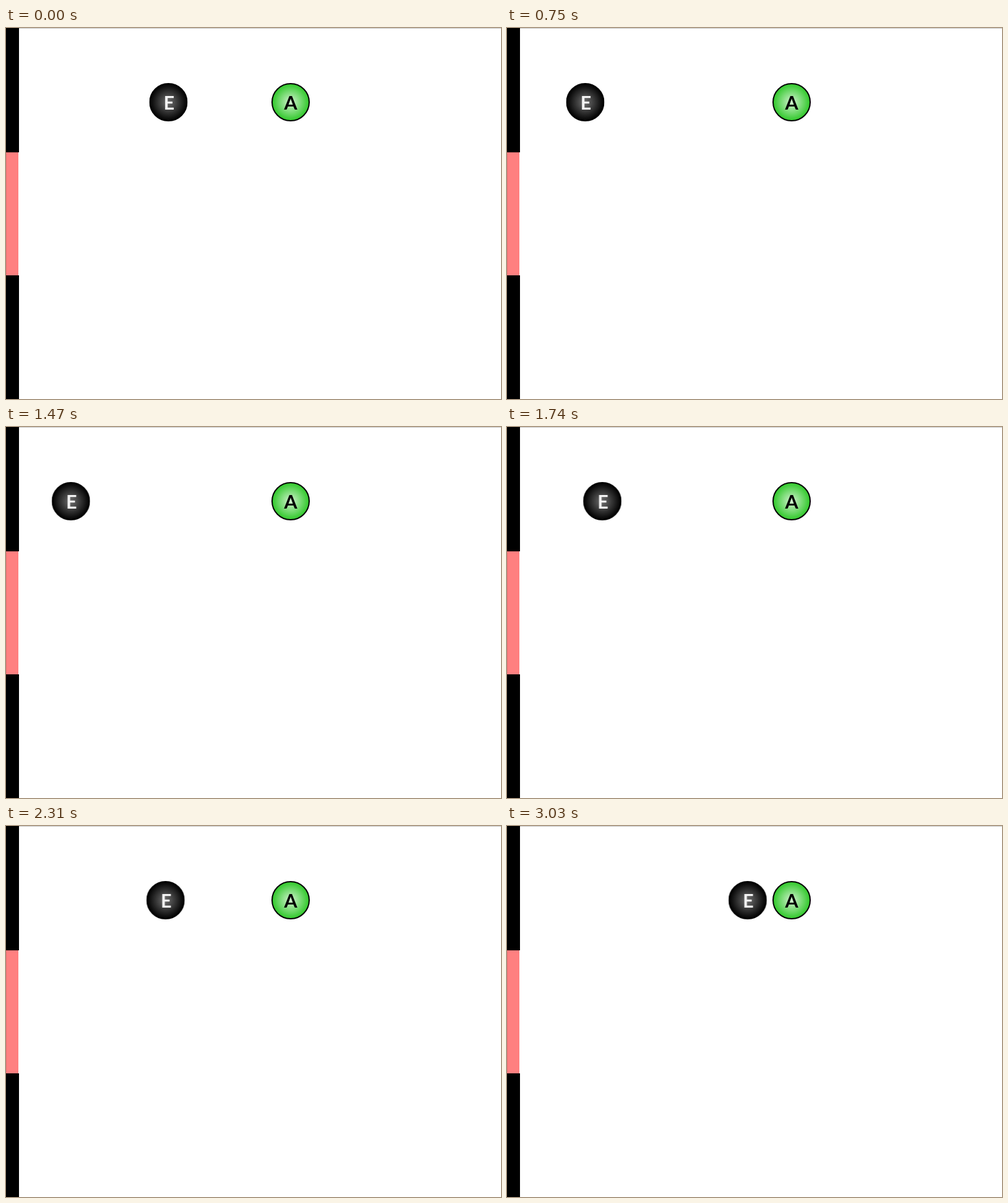
Animation of 800 by 600 pixels, one loop 3060 ms. Source, as an HTML page:

```html
<!DOCTYPE html>
<html lang="en">
<head>
<meta charset="utf-8">
<title>Bouncing ball</title>
<style>
  html, body { margin: 0; width: 100%; height: 100%; overflow: hidden; background: #fff; }
  svg { display: block; width: 800px; height: 600px; }
  text { font: bold 30.5px Lato, Carlito, sans-serif; text-anchor: middle; }
  circle { stroke: #000; stroke-width: 2px; }

  /* 30 ms ticks; the tiny delay keeps ticks clear of rounding */
  .mover { animation: bounce 3060ms -1ms infinite; }
  @keyframes bounce {
    0% { transform: translate(262.5px, 120px); animation-timing-function: steps(39); }
    38.2353% { transform: translate(50.2px, 120px); animation-timing-function: steps(63); }
    100% { transform: translate(394.4px, 120px); }
  }
</style>
</head>
<body>
<svg viewBox="0 0 800 600">
  <defs>
    <radialGradient id="dark">
      <stop offset="0" stop-color="#707070"/>
      <stop offset="1" stop-color="#000"/>
    </radialGradient>
    <radialGradient id="green">
      <stop offset="0" stop-color="#d2f2d0"/>
      <stop offset="1" stop-color="#2fc829"/>
    </radialGradient>
  </defs>

  <path d="M21 0H800V1H21Z" fill="#c6c6c6"/>
  <path d="M0 0H21V201H0ZM0 400H21V600H0Z"/>
  <path d="M0 201H20V400H0Z" fill="#ff8080"/>
  <path d="M0 201H1V400H0ZM0 201H20V202H0Z" fill="#e27272"/>

  <g transform="translate(460 120)">
    <circle r="30" fill="url(#green)"/>
    <text y="12">A</text>
  </g>
  <g class="mover">
    <circle r="30" fill="url(#dark)"/>
    <text x="1" y="12" fill="#f4f4f4">E</text>
  </g>
</svg>
</body>
</html>
```
